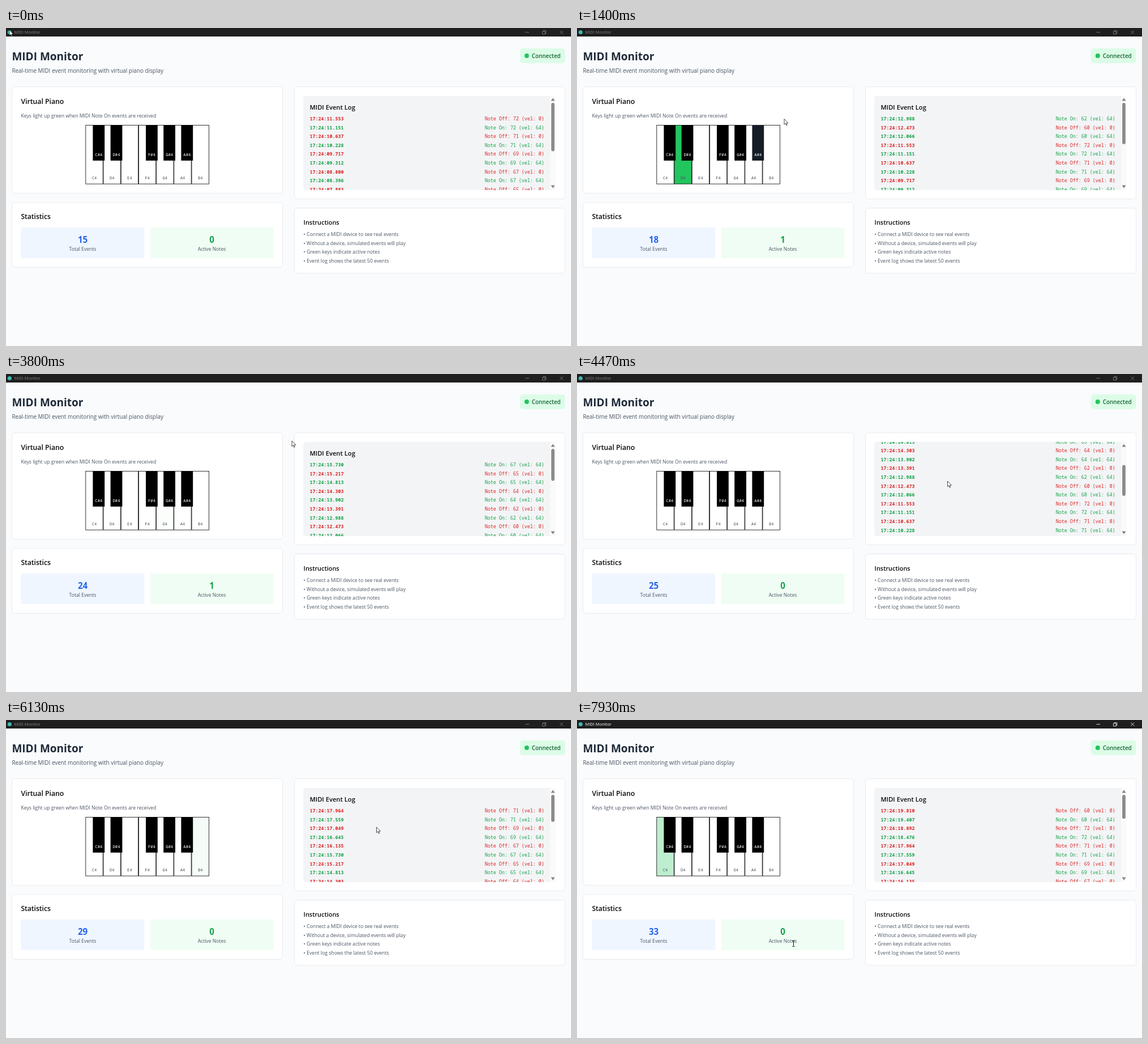
An HTML page for the animation above (8 s loop, 998 by 561 pixels).

```html
<!DOCTYPE html>
<html lang="en">
<head>
<meta charset="utf-8">
<title>MIDI Monitor</title>
<style>
html, body { margin: 0; height: 100%; overflow: hidden; background: #f9fbfd; }
svg { display: block; width: 100%; height: 100%; font-family: "Open Sans", "Noto Sans", sans-serif; }
.mono { font-family: "Noto Sans Mono", "DejaVu Sans Mono", monospace; }
.card { fill: #fff; stroke: #e5e7eb; stroke-width: .8; filter: drop-shadow(0 .7px .7px #0001); }
.chrome { fill: none; stroke: currentColor; stroke-width: .8; }
.semi { font-weight: 600; }
.bold { font-weight: 700; }
.mid { text-anchor: middle; }
.end { text-anchor: end; }
</style>
</head>
<body>
<svg id="stage" viewBox="0 0 998 561"></svg>
<script>
const LOOP = 8000, FPS = 15;
const ROW = 15.6, VIEW = 166.4, HEAD = 41, TRACK = 141;
const KEY_W = 31.2, PIANO_X = 140.4, PIANO_Y = 171.3;
const SCALE = [60, 62, 64, 65, 67, 69, 71, 72];
const GREEN = [34, 197, 94], WHITE = [255, 255, 255];

// Milliseconds after 17:24; each off is followed by the next note's on.
const events = [
  5130, 5644, 6061, 6561, 6967, 7481, 7883, 8396, 8800, 9312, 9717,
  10228, 10637, 11151, 11553, 12066, 12473, 12988, 13391, 13902, 14303,
  14813, 15217, 15730, 16135, 16645, 17049, 17559, 17964, 18476, 18892,
  19407, 19810
].map((ms, i) => {
  const on = i % 2 === 1;
  return { ms, on, note: SCALE[((i + 1) >> 1) % 8], at: ms - (on ? 11932 : 11944) };
});

// Pointer path: time, x, y
const path = [
  [267, 6, 3.5], [1000, 262, 205], [1330, 322, 196], [1400, 366, 160.5], [1600, 393, 144],
  [2600, 393, 144], [3000, 450, 69], [3733, 450, 69], [3800, 505, 118],
  [4000, 654.5, 189], [7200, 654.5, 189], [7667, 382, 393]
];

const clamp = x => Math.max(0, Math.min(1, x));
const smooth = (t, a, b) => { const x = clamp((t - a) / (b - a)); return x * x * (3 - 2 * x); };
const mix = (a, b, k) => `rgb(${a.map((v, i) => Math.round(v + (b[i] - v) * k))})`;

// cubic-bezier(.4, 0, .2, 1)
function ease(x) {
  x = clamp(x);
  let lo = 0, hi = 1;
  for (let i = 0; i < 20; i++) {
    const s = (lo + hi) / 2, r = 1 - s;
    if (1.2 * s * r * r + .6 * s * s * r + s * s * s < x) lo = s; else hi = s;
  }
  return lo * lo * (3 - 2 * lo);
}

function pointer(t) {
  const i = path.findIndex(p => p[0] > t);
  if (i === 0) return path[0].slice(1);
  if (i < 0) return path[path.length - 1].slice(1);
  const [t0, x0, y0] = path[i - 1], [t1, x1, y1] = path[i];
  const k = (t - t0) / (t1 - t0);
  return [x0 + (x1 - x0) * k, y0 + (y1 - y0) * k];
}

const text = (x, y, size, fill, str, cls = '', id = '') =>
  `<text x="${x}" y="${y}" font-size="${size}" fill="${fill}" class="${cls}" id="${id}">${str}</text>`;
const rect = (x, y, w, h, attrs) =>
  `<rect x="${x}" y="${y}" width="${w}" height="${h}" ${attrs}/>`;
const card = (x, y, h) => rect(x, y, 478, h, 'rx="5" class="card"');

function piano() {
  const whites = [...'CDEFGAB'].map((n, i) => {
    const x = PIANO_X + i * KEY_W;
    return rect(x + .4, PIANO_Y + .2, KEY_W - .8, 103.6, `id="w${SCALE[i]}" fill="#fff" stroke="#000" stroke-width=".8"`) +
      text(x + KEY_W / 2, 267.2, 7.15, '#4b5563', n + 4, 'mono mid');
  });
  const blacks = [['C', 0], ['D', 1], ['F', 3], ['G', 4], ['A', 5]].map(([n, i]) => {
    const x = PIANO_X + i * KEY_W + 13;
    return rect(x, PIANO_Y, 20.8, 62.6, `id="b${n}" fill="#000"`) +
      text(x + 10.4, 226.2, 7.15, '#fff', n + '#4', 'mono mid');
  });
  return whites.join('') + blacks.join('');
}

const $ = id => document.getElementById(id);
const tips = ['Connect a MIDI device to see real events', 'Without a device, simulated events will play',
  'Green keys indicate active notes', 'Event log shows the latest 50 events'];

$('stage').innerHTML =
  '<clipPath id="panel">' + rect(525.2, 119.7, 446, VIEW, 'rx="5"') + '</clipPath>' +
  rect(0, 0, 998, 15, 'fill="#1f1f1f"') +
  '<circle cx="6.3" cy="7.5" r="3.6" fill="#3fb8b0"/><g id="bar">' +
  text(14.5, 10.4, 7.5, 'currentColor', 'MIDI Monitor') +
  '<path class="chrome" d="M917.5 7.5h6.5M947.5 6h4.8v4.8h-4.8zM949 6v-1.3h4.8v4.8h-1.4M978.3 4.5l6 6m0-6l-6 6"/></g>' +
  text(10.4, 57, 19, '#1f2937', 'MIDI Monitor', 'bold') +
  text(10.4, 79, 9.92, '#4b5563', 'Real-time MIDI event monitoring with virtual piano display') +
  rect(908, 36, 79.6, 26, 'rx="5" fill="#dcfce7"') +
  '<circle cx="919.8" cy="49" r="4" fill="#22c55e"/>' +
  text(928.7, 52.8, 9.87, '#166534', 'Connected', 'semi') +

  card(10.5, 103.6, 188) + card(10.5, 307.4, 114.6) +
  card(509.6, 103.6, 198) + card(509.6, 317.7, 115) +

  text(26.4, 133.8, 12.25, '#0a0a0a', 'Virtual Piano', 'semi') +
  text(26.4, 158.3, 8.69, '#4b5563', 'Keys light up green when MIDI Note On events are received') +
  piano() +

  text(26.4, 337.4, 12.1, '#0a0a0a', 'Statistics', 'semi') +
  rect(26.5, 351.7, 217.8, 54.4, 'rx="1" fill="#eff6ff"') +
  rect(254.7, 351.7, 217.8, 54.4, 'rx="1" fill="#f0fdf4"') +
  text(135.5, 378.7, 15.1, '#2563eb', '', 'bold mid', 'total') +
  text(363.5, 378.7, 15.1, '#16a34a', '', 'bold mid', 'active') +
  text(135.5, 393.2, 8.6, '#4b5563', 'Total Events', 'mid') +
  text(363.5, 393.2, 8.6, '#4b5563', 'Active Notes', 'mid') +

  '<g clip-path="url(#panel)">' + rect(525, 119, 447, 168, 'fill="#f3f4f6"') +
  '<g id="log">' + text(536.4, 143.9, 11.2, '#0a0a0a', 'MIDI Event Log', 'semi') + '<g id="rows"></g></g>' +
  rect(961, 119, 11, 168, 'fill="#fafafa"') +
  '<path d="M963 128.2l3-4.4 3 4.4zM963 277.8l3 4.4 3-4.4z" fill="#858585" stroke="#858585" stroke-width=".6" stroke-linejoin="round"/>' +
  rect(963.1, 132, 5.8, 80, 'id="thumb" rx="2.9" fill="#8b8b8b"') + '</g>' +

  text(525.6, 346.9, 10.9, '#0a0a0a', 'Instructions', 'semi') +
  tips.map((s, i) => text(525.6, 367.2 + i * ROW, 8.69, '#4b5563', '• ' + s)).join('') +

  '<g id="arrow"><path d="M0 0V9.8L2.3 7.7 3.8 11.3 5.3 10.7 3.8 7.2H6.9Z" fill="#fff" stroke="#000" stroke-width=".7"/></g>' +
  '<path id="beam" d="M380.2 389.5h1.6l.7.6.7-.6h1.6M382.5 390v9M380.2 399.5h1.6l.7-.6.7.6h1.6" fill="none" stroke="#000" stroke-width=".9"/>';

function logRows(n) {
  return events.slice(0, n).reverse().map((e, i) => {
    const y = 163 + i * ROW, fill = e.on ? '#16a34a' : '#dc2626';
    const time = '17:24:' + (e.ms / 1000).toFixed(3).padStart(6, '0');
    const what = e.on ? `Note On: ${e.note} (vel: 64)` : `Note Off: ${e.note} (vel: 0)`;
    return text(536.4, y, 8.35, fill, time, 'mono bold') + text(950.8, y, 8.35, fill, what, 'mono end');
  }).join('');
}

let shown = 0;
function draw(t) {
  const n = events.filter(e => e.at <= t).length, last = events[n - 1];
  if (n !== shown) {
    shown = n;
    $('rows').innerHTML = logRows(n);
    $('total').textContent = n;
    $('active').textContent = last.on ? 1 : 0;
  }

  const k = ease((t - last.at + (last.on ? 10 : 0)) / 150);
  for (const note of SCALE.slice(0, 7)) {
    const lit = note === last.note ? (last.on ? k : 1 - k) : 0;
    $('w' + note).setAttribute('fill', mix(WHITE, GREEN, lit));
  }
  const hover = ease((t - 1220) / 150) - ease((t - 1358) / 150);
  $('bA').setAttribute('fill', mix([0, 0, 0], [31, 41, 55], hover));

  const content = HEAD + n * ROW, max = content - VIEW;
  const scroll = Math.min(max, 280.2 * (smooth(t, 4230, 4867) - smooth(t, 5880, 6130)));
  const size = TRACK * VIEW / content;
  $('log').setAttribute('transform', `translate(0 ${-scroll})`);
  $('thumb').setAttribute('height', size);
  $('thumb').setAttribute('y', 132 + (TRACK - size) * scroll / max);

  const beam = t > 7860;
  $('arrow').setAttribute('transform', `translate(${pointer(t)})`);
  $('arrow').style.display = beam ? 'none' : '';
  $('beam').style.display = beam ? '' : 'none';
  $('bar').style.color = t > 7590 ? '#fff' : '#858585';
}

const start = performance.now();
function tick() {
  const now = (performance.now() - start) % LOOP;
  draw(Math.floor((now + 4) * FPS / 1000) % (LOOP * FPS / 1000) * 1000 / FPS);
  requestAnimationFrame(tick);
}
tick();
</script>
</body>
</html>
```
